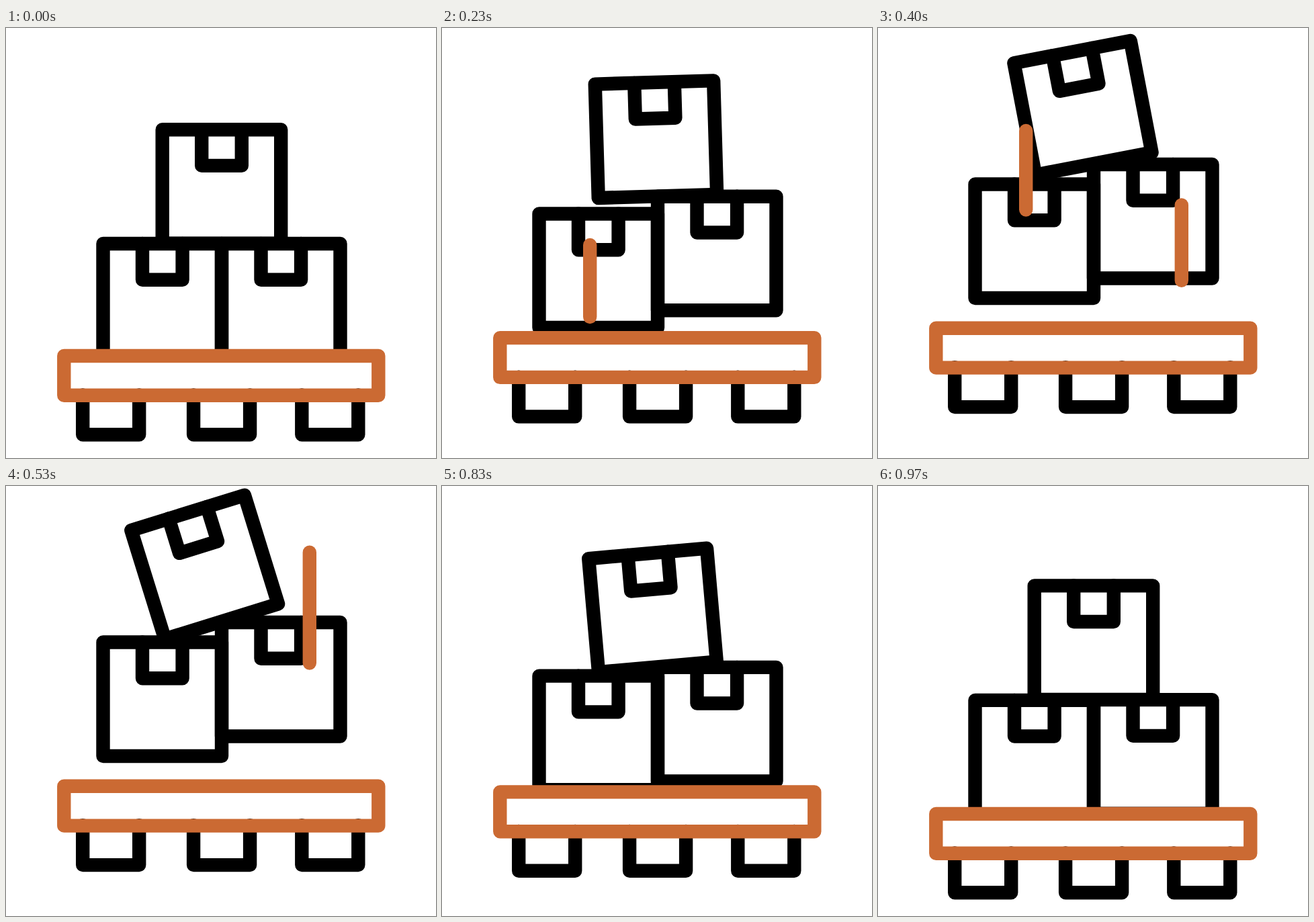
Recreate the animation shown at these times as an HTML page. Size 640x640 px, loop 1.67 s.

```html
<!DOCTYPE html>
<html lang="en">
<head>
<meta charset="utf-8">
<title>Stacked boxes on a pallet</title>
<style>
  html, body { margin: 0; width: 100%; height: 100%; overflow: hidden; background: #fff; }
  svg { display: block; width: 100vw; height: 100vh; }
  .ink, .accent { fill: none; stroke: #000; stroke-width: 20.4; stroke-linecap: round; stroke-linejoin: round; }
  .accent { stroke: #cb6a33; }
</style>
</head>
<body>
<svg viewBox="0 0 640 640">
  <defs>
    <!-- Box with its origin at the top left corner -->
    <g id="box">
      <path d="M0 0H176.5V169.5H0Z"/>
      <path d="M58.5 0V53.7H118.1V0"/>
    </g>
    <path id="leg" d="M0 546.5V605.3H84V546.5"/>
  </defs>
  <g class="ink">
    <g id="left"><use href="#box" x="144.5" y="321"/></g>
    <g id="right"><use href="#box" x="321" y="321"/></g>
    <g id="top"><use href="#box" x="232.7" y="151.2"/></g>
  </g>
  <g id="pallet">
    <path fill="#fff" d="M86.3 488H554.3V546.8H86.3Z"/>
    <g class="ink">
      <use href="#leg" x="114.2"/>
      <use href="#leg" x="279.1"/>
      <use href="#leg" x="440.3"/>
    </g>
    <path class="accent" d="M86.3 488H554.3V546.8H86.3Z"/>
  </g>
  <path id="streakA" class="accent"/>
  <path id="streakB" class="accent"/>
</svg>
<script>
  const LOOP = 1670, HOLD = 100, STEP = 100 / 3, LAST = 27;
  const $ = id => document.getElementById(id);
  const t0 = performance.now();

  // Bezier easing (x1, 0, x2, 1) between steps a and b
  function ease(k, a, b, x1 = 0.25, x2 = 0.75) {
    const u = (k - a) / (b - a);
    if (u <= 0) return 0;
    if (u >= 1) return 1;
    let lo = 0, hi = 1;
    for (let i = 0; i < 24; i++) {
      const m = (lo + hi) / 2, n = 1 - m;
      const x = 3 * x1 * m * n * n + 3 * x2 * m * m * n + m * m * m;
      if (x < u) lo = m; else hi = m;
    }
    return lo * lo * (3 - 2 * lo);
  }

  const fall = k => 1 - ease(k, 17.5, 28, 0.28, 0.66);

  const move = (id, y, turn = "") =>
    $(id).setAttribute("transform", `translate(0 ${y.toFixed(3)}) ${turn}`);

  // Line shooting upward, its tail following four steps behind its head
  function streak(id, k, x, base, start) {
    const reach = 277, span = 7, lag = 4;
    const head = reach * ease(k, start, start + span);
    const tail = reach * ease(k - lag, start, start + span);
    $(id).setAttribute("d", head - tail > 0.5 ? `M${x} ${base - tail}V${base - head}` : "");
  }

  function draw(k) {
    const rightY = -118 * ease(k, 0.2, 8.6) * fall(k);
    const leftY = -88.5 * ease(k, 0.77, 9.2) * fall(k);
    const palletY = -41.2 * ease(k, 1, 7.5) * (1 - ease(k, 21.5, 27));
    const tilt = -17.74 * ease(15 - Math.abs(k - 15), 3, 15);
    move("left", leftY);
    move("right", rightY);
    move("top", rightY, `rotate(${tilt.toFixed(3)} 317.5 320.7)`);
    move("pallet", palletY);
    streak("streakA", k, 220.2, 430, 2.1);
    streak("streakB", k, 451.8, 375.7, 7);
  }

  function tick() {
    const t = (performance.now() - t0) % LOOP;
    const k = t < HOLD ? 0 : Math.min(LAST, 1 + Math.floor((t - HOLD + 3.4) / STEP));
    draw(k);
    requestAnimationFrame(tick);
  }

  tick();
</script>
</body>
</html>
```
